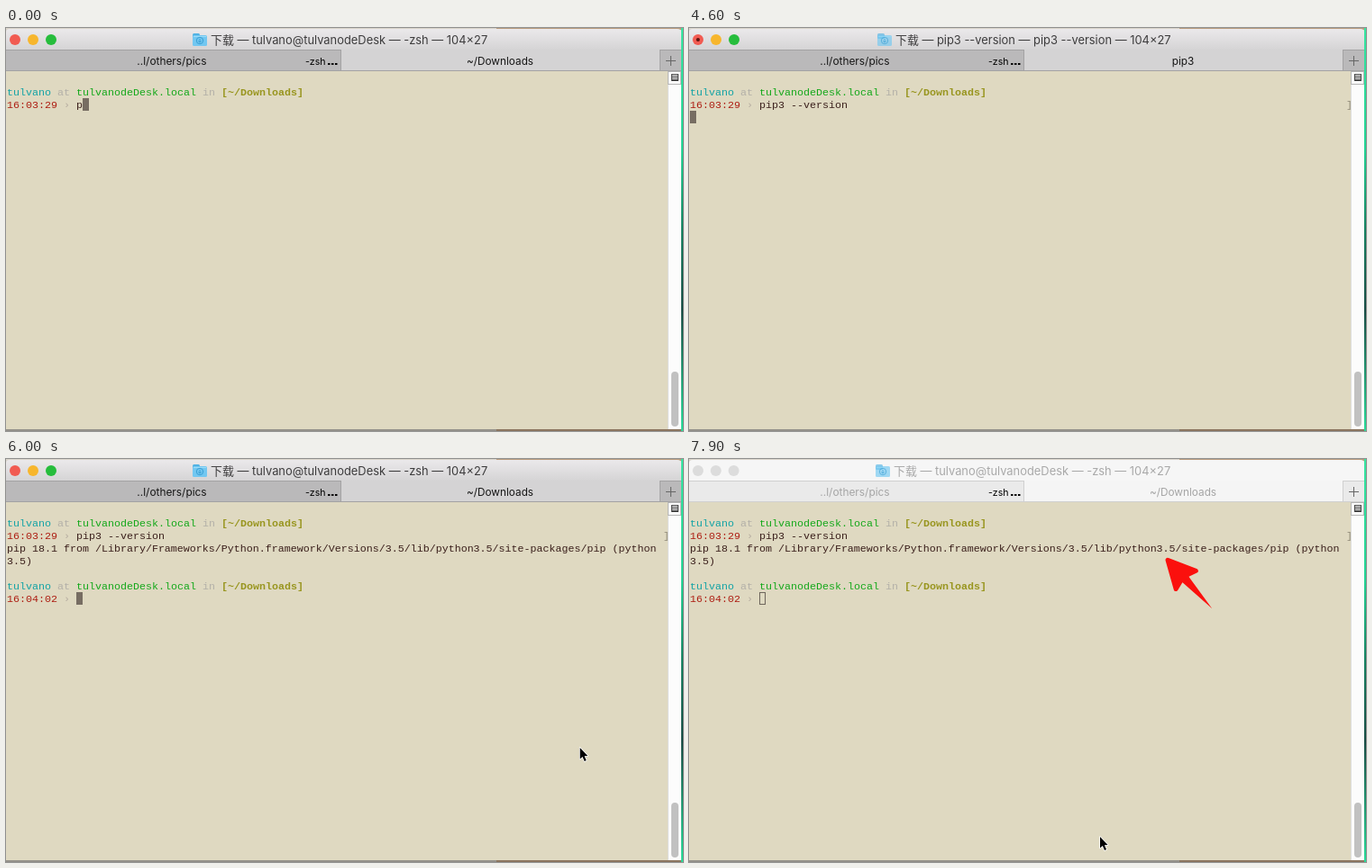
An HTML page with a canvas for the animation above (8000 ms loop, 751 by 448 pixels).

```html
<!DOCTYPE html>
<html lang="zh">
<head>
<meta charset="utf-8">
<title>Terminal</title>
<style>
html, body { margin: 0; width: 751px; height: 448px; overflow: hidden; }
canvas { display: block; }
</style>
</head>
<body>
<canvas id="stage" width="751" height="448"></canvas>
<script>
const c = document.getElementById('stage').getContext('2d');
const LOOP = 8000, CELL = 7, ROW = 14;
const USER = 'tulvano', HOST = 'tulvanodeDesk';
const UI = 'Inter, "Noto Sans CJK SC", "Noto Sans CJK", sans-serif';
const MONO = '"Liberation Mono", monospace';
const INK = '#3a1f1b', HIGHLIGHT = '#4a2a28';

// Time at which the command line takes on each text
const TYPED = [
  [0, 'p'], [100, 'pip'], [300, 'pip3'], [2500, 'pip3 '], [2900, 'pip3 -'],
  [3100, 'pip3 --'], [3400, 'pip3 --v'], [3600, 'pip3 --ve'], [3700, 'pip3 --ver'],
  [3800, 'pip3 --vers'], [3900, 'pip3 --versi'], [4000, 'pip3 --version']
];
const LIST = 900, SELECT = 1900, ACCEPT = 2500, ENTER = 4400, RETITLE = 4500, DONE = 5100;
const POINTER = 5900, BLUR = 6200, PRESS = 6700, RELEASE = 7500, REST = 7900;
const TAIL = [581, 167], TIP = [529, 110];

function rect(x, y, w, h, color) {
  c.fillStyle = color;
  c.fillRect(x, y, w, h);
}

function round(x, y, w, h, r, color) {
  c.fillStyle = color;
  c.beginPath();
  c.roundRect(x, y, w, h, r);
  c.fill();
}

function disc(x, y, r, color) {
  c.fillStyle = color;
  c.beginPath();
  c.arc(x, y, r, 0, Math.PI * 2);
  c.fill();
}

function label(text, x, y, size, color, align = 'left') {
  c.font = `${size}px ${UI}`;
  c.textAlign = align;
  c.fillStyle = color;
  c.fillText(text, x, y);
}

function term(text, col, row, color, weight = 400) {
  c.font = `${weight} 11.667px ${MONO}`;
  c.textAlign = 'left';
  c.fillStyle = color;
  c.fillText(text, 1 + col * CELL, 75 + row * ROW);
}

function polygon(points) {
  c.beginPath();
  points.forEach(p => c.lineTo(...p));
  c.closePath();
}

const clamp = v => Math.min(1, Math.max(0, v));
const ease = v => v * v * (3 - 2 * v);
const mix = (a, b, v) => a.map((n, i) => n + (b[i] - n) * v);

function desktop() {
  rect(0, 0, 751, 448, '#d9d4ca');
  rect(544, 0, 207, 2, '#b99b7d');
  rect(0, 446, 751, 2, '#94918a');
  rect(544, 446, 207, 2, '#8b755f');
  const g = c.createLinearGradient(0, 0, 0, 448);
  g.addColorStop(0, '#35e5a0');
  g.addColorStop(0.3, '#1fd393');
  g.addColorStop(0.5, '#12805f');
  g.addColorStop(0.7, '#164a43');
  g.addColorStop(1, '#25dc98');
  rect(749, 0, 2, 448, g);
}

function folder(x, alpha) {
  c.globalAlpha = alpha;
  round(x, 6, 8, 6, 1.5, '#51b2e3');
  round(x, 8, 16, 12, 1.5, '#72c7f1');
  rect(x + 1, 9, 14, 1, '#9bdcf8');
  c.strokeStyle = '#3a9fd3';
  c.lineWidth = 1;
  c.beginPath();
  c.arc(x + 8, 14, 3.7, 0, Math.PI * 2);
  c.moveTo(x + 8, 12);
  c.lineTo(x + 8, 16);
  c.moveTo(x + 6.3, 14.5);
  c.lineTo(x + 8, 16);
  c.lineTo(x + 9.7, 14.5);
  c.stroke();
  c.globalAlpha = 1;
}

function chrome(active, running, retitled) {
  const bar = c.createLinearGradient(0, 1, 0, 24);
  bar.addColorStop(0, active ? '#ebe9eb' : '#f6f6f6');
  bar.addColorStop(1, active ? '#d5d4d5' : '#f6f6f6');
  c.fillStyle = bar;
  c.beginPath();
  c.roundRect(0, 1, 749, 24, [4, 4, 0, 0]);
  c.fill();

  ['#f15b52', '#f7b62d', '#26bd3c'].forEach((color, i) =>
    disc(10 + i * (active ? 20 : 19.8), 13, 6, active ? color : '#dcdcdc'));
  if (running && active) disc(10, 13, 2, '#5c1410');

  const ink = active ? '#3d3c3d' : '#a9a9a9';
  folder(retitled ? 209 : 207, retitled || !active ? 0.65 : 1);
  const what = retitled ? 'pip3 --version — pip3 --version' : `${USER}@${HOST} — -zsh`;
  label(`下载 — ${what} — 104×27`, retitled ? 229 : 227, 18, 12.9, ink);

  const line = active ? '#a3a2a3' : '#d0d0d0';
  rect(0, 24, 749, 24, active ? '#bab9ba' : '#eaeaea');
  rect(0, 24, 749, 1, line);
  rect(372, 24, 353, 24, active ? '#d4d3d4' : '#f5f5f5');
  rect(0, 47, 749, 1, line);
  rect(371, 24, 1, 24, line);
  rect(725, 24, 1, 24, line);
  const tabInk = active ? '#171717' : '#a5a5a5';
  label('..l/others/pics', 184, 41, 11.9, tabInk, 'center');
  label('-zsh', 332, 41, 10.6, '#000');
  for (let i = 0; i < 3; i++) rect(357 + i * 4, 39, 2.5, 2, '#000');
  label(retitled ? 'pip3' : '~/Downloads', 548, 41, 11.8, tabInk, 'center');
  rect(732, 36, 11, 1, '#666');
  rect(737, 31, 1, 11, '#666');
}

function body() {
  rect(0, 48, 735, 398, '#dfd9c1');
  rect(734, 48, 15, 398, '#fcfcfc');
  rect(734, 48, 1, 398, '#dedede');
  c.lineWidth = 1;
  c.strokeStyle = '#b5b5b5';
  c.strokeRect(734.5, 48.5, 14, 14);
  c.strokeStyle = '#444';
  c.strokeRect(738.5, 51.5, 7, 7);
  for (let y = 53; y < 58; y += 2) rect(739, y, 7, 1, '#444');
  round(738, 382, 8, 61, 4, '#c1c1c1');
}

function prompt(row, clock) {
  term(USER, 0, row, '#12a3a5');
  term('at', 8, row, '#b3b0a8');
  term(HOST + '.local', 11, row, '#14a81a');
  term('in', 31, row, '#b3b0a8');
  term('[~/Downloads]', 34, row, '#98951e', 700);
  term(clock, 0, row + 1, '#ad1d12');
  term('›', 9, row + 1, '#b5aca0');
}

function caret(col, row, active) {
  const x = 1 + col * CELL, y = 64 + row * ROW;
  if (active) return rect(x, y, CELL, ROW, '#776d62');
  c.strokeStyle = '#6e665c';
  c.lineWidth = 1;
  c.strokeRect(x + 0.5, y + 0.5, CELL - 1, ROW - 1);
}

function shell(t, active) {
  const command = TYPED.filter(([at]) => at <= t).pop()[1];
  prompt(0, '16:03:29');
  term(command, 11, 1, INK);
  if (t >= LIST) term(']', 104, 1, '#8d8775');
  if (t < ENTER) caret(11 + command.length, 1, active);
  else if (t < DONE) caret(0, 2, active);

  if (t >= LIST && t < ACCEPT) {
    const selected = t >= SELECT;
    if (selected) rect(1, 92, 42, 14, HIGHLIGHT);
    term('pip3', 0, 2, selected ? '#e8dfca' : INK, selected ? 700 : 400);
    term('pip3.5', 8, 2, INK);
    term('pip3.7', 16, 2, INK);
  }
  if (t >= DONE) {
    term('pip 18.1 from /Library/Frameworks/Python.framework/Versions/3.5/lib/python3.5/site-packages/pip (python', 0, 2, INK);
    term('3.5)', 0, 3, INK);
    prompt(5, '16:04:02');
    caret(11, 6, active);
  }
}

function redArrow(progress) {
  if (progress <= 0) return;
  const [x, y] = mix(TAIL, TIP, progress);
  c.save();
  c.translate(x, y);
  c.rotate(Math.atan2(TAIL[1] - TIP[1], TAIL[0] - TIP[0]));
  c.scale(progress, progress);
  polygon([[3, 0], [33, 15], [30, 5], [76, 0], [30, -5], [33, -15]]);
  c.fillStyle = c.strokeStyle = '#fb100d';
  c.lineJoin = 'round';
  c.lineWidth = 5;
  c.fill();
  // Stroke only the head so that the tail stays pointed
  polygon([[3, 0], [33, 15], [30, 5], [30, -5], [33, -15]]);
  c.stroke();
  c.restore();
}

function pointer([x, y], pressed) {
  if (pressed) {
    c.strokeStyle = '#000';
    c.lineWidth = 3;
    c.beginPath();
    c.arc(x, y + 1, 20, 0, Math.PI * 2);
    c.stroke();
  }
  c.save();
  c.translate(x, y);
  polygon([[0, 0], [0, 12.5], [2.8, 10], [5, 15], [7, 14], [4.9, 9.3], [8.6, 9.1]]);
  c.lineJoin = 'round';
  c.strokeStyle = '#fff';
  c.lineWidth = 1.6;
  c.stroke();
  c.fillStyle = '#000';
  c.fill();
  c.restore();
}

function draw(t) {
  const active = t < BLUR;
  desktop();
  chrome(active, t >= ENTER && t < DONE, t >= RETITLE && t < DONE);
  body();
  shell(t, active);
  if (t < POINTER) return;
  const drag = ease(clamp((t - PRESS) / (RELEASE - PRESS - 100)));
  redArrow(drag);
  let at = mix([640, 330], TAIL, ease(clamp((t - POINTER) / (PRESS - 100 - POINTER))));
  if (t >= PRESS) at = mix(TAIL, TIP, drag);
  if (t >= RELEASE) at = mix(TIP, [456, 420], ease(clamp((t - RELEASE) / (REST - RELEASE))));
  pointer(at, t >= PRESS && t < RELEASE);
}

function tick() {
  draw(Math.floor(performance.now() % LOOP / 100) * 100);
  requestAnimationFrame(tick);
}
tick();
</script>
</body>
</html>
```
